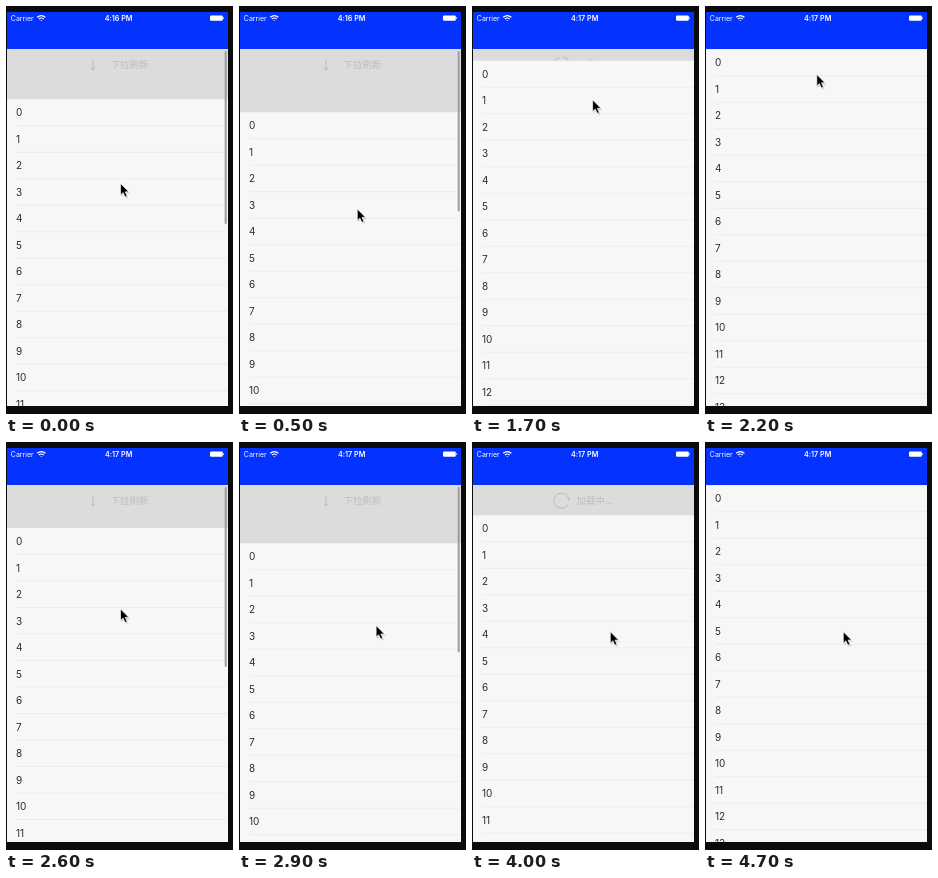
Write an HTML page that moves like this. It is 227x408 px and loops after 5 s.

```html
<!DOCTYPE html>
<html lang="zh">
<head>
<meta charset="utf-8">
<style>
  html, body { margin: 0; width: 100%; height: 100%; overflow: hidden; background: #0b0b0b; }
  svg { display: block; width: 100%; height: 100%; }
  text { font-family: Inter, Roboto, sans-serif; }
  .status { font-size: 7px; fill: #fff; }
  .hint { font: 9.5px "Noto Sans CJK SC", "Noto Sans CJK", "Noto Sans CJK JP", sans-serif; fill: #bdbdbd; }
  .line { fill: none; stroke: #bababa; stroke-width: 1; }
  #rows text { font-size: 10px; fill: #2b2b2b; }
</style>
</head>
<body>
<svg viewBox="0 0 227 408">
  <rect x="1" y="43" width="221" height="357" fill="#dcdcdc"/>
  <g id="pull">
    <path class="line" d="M87 53V64M84.8 61.6L87 64L89.2 61.6"/>
    <text class="hint" x="104.5" y="62">下拉刷新</text>
  </g>
  <g id="loading">
    <path id="arc" class="line" d="M96.2 62.1A7.5 7.5 0 1 1 97 58.5"/>
    <text class="hint" x="104.5" y="62">加载中...</text>
  </g>
  <g id="rows"><rect x="1" width="221" height="400" fill="#f7f7f7"/></g>
  <rect id="bar" x="218.7" y="45" width="2" rx="1" fill="#9c9c9c"/>

  <rect x="1" y="6" width="221" height="37" fill="#0433ff"/>
  <text class="status" x="4.8" y="14.6">Carrier</text>
  <g fill="none" stroke="#fff" stroke-width="1.2">
    <path d="M31.2 11.3Q35.3 7.9 39.4 11.3M32.9 13Q35.3 11 37.7 13"/>
    <path d="M34.4 14L35.3 15L36.2 14Z" fill="#fff" stroke="none"/>
  </g>
  <text class="status" id="clock" x="112.6" y="14.6" text-anchor="middle" font-weight="600" style="font-size:7.2px"></text>
  <rect x="204" y="9.4" width="12.8" height="5.4" rx="1.2" fill="#fff"/>
  <rect x="217" y="11.2" width=".7" height="1.8" fill="#fff"/>
  <rect y="400" width="227" height="8" fill="#0b0b0b"/>

  <g id="cursor">
    <path d="M1 2V14L4 11.5L6 16L8.3 15L6.4 10.8H10.3Z" fill="#000" opacity=".16"/>
    <path d="M0 0V12.2L2.8 9.7L4.8 14.3L7 13.3L5 8.9H8.8Z" fill="#000" stroke="#fff" stroke-width=".7"/>
  </g>
</svg>
<script>
const $ = id => document.getElementById(id);
const LOOP = 5000, STEP = 100, TOP = 43.3, ROW = 26.5;

// Each refresh: drag down, release, settle to the loading height, close
const STARTS = [-515, 2200];
const DRAG = 1100, CLOSE = 2100, SETTLE = 300;
const MAX_PULL = 63, LOAD_PULL = 30;

// Mouse stops: ms, x, y
const MOUSE = [
  [0, 114.5, 177.5], [600, 119, 208], [1000, 133, 129.5], [2200, 111.8, 68.5],
  [2600, 114.5, 167], [3300, 167.3, 205.7], [3700, 138.3, 189.7], [LOOP, 138.3, 189.7]
];

const clamp = v => Math.min(1, Math.max(0, v));
const lerp = (a, b, k) => a + (b - a) * k;
const easeOut = (p, power) => 1 - (1 - clamp(p)) ** power;

function pullAt(age) {
  if (age <= DRAG) return MAX_PULL * easeOut(age / DRAG, 2.5);
  if (age < CLOSE) return lerp(MAX_PULL, LOAD_PULL, easeOut((age - DRAG) / SETTLE, 2));
  return LOAD_PULL * (1 - easeOut((age - CLOSE) / SETTLE, 2));
}

function mouseAt(t) {
  const i = MOUSE.findIndex(stop => stop[0] > t);
  const [t0, x0, y0] = MOUSE[i - 1], [t1, x1, y1] = MOUSE[i];
  const k = (t - t0) / (t1 - t0);
  return [lerp(x0, x1, k), lerp(y0, y1, k)];
}

let rows = '';
for (let i = 0; i < 14; i++) {
  rows += `<text x="10" y="${i * ROW + 17.2}">${i}</text>` +
    `<path d="M10 ${(i + 1) * ROW}H222" stroke="#e9e9e9" stroke-width=".7"/>`;
}
$('rows').insertAdjacentHTML('beforeend', rows);

function set(id, name, value) {
  $(id).setAttribute(name, value);
}

function draw(now) {
  const t = Math.floor(now % LOOP / STEP) * STEP;
  const age = t - STARTS.findLast(start => start <= t);
  const pull = pullAt(age);
  const busy = age >= DRAG;

  set('rows', 'transform', `translate(0 ${TOP + pull})`);
  set('cursor', 'transform', `translate(${mouseAt(t)}) scale(.94)`);
  set('bar', 'height', 221 - 0.96 * pull);
  set('bar', 'opacity', clamp(age / 200) * clamp(1 - (age - DRAG) / SETTLE));
  set('pull', 'visibility', busy ? 'hidden' : 'visible');
  set('loading', 'visibility', busy ? 'visible' : 'hidden');
  set('arc', 'transform', `rotate(${t * 0.36} 89.5 58.5)`);
  $('clock').textContent = t < 600 ? '4:16 PM' : '4:17 PM';
}

const start = performance.now();
function tick() {
  draw(performance.now() - start);
  requestAnimationFrame(tick);
}
tick();
</script>
</body>
</html>
```
